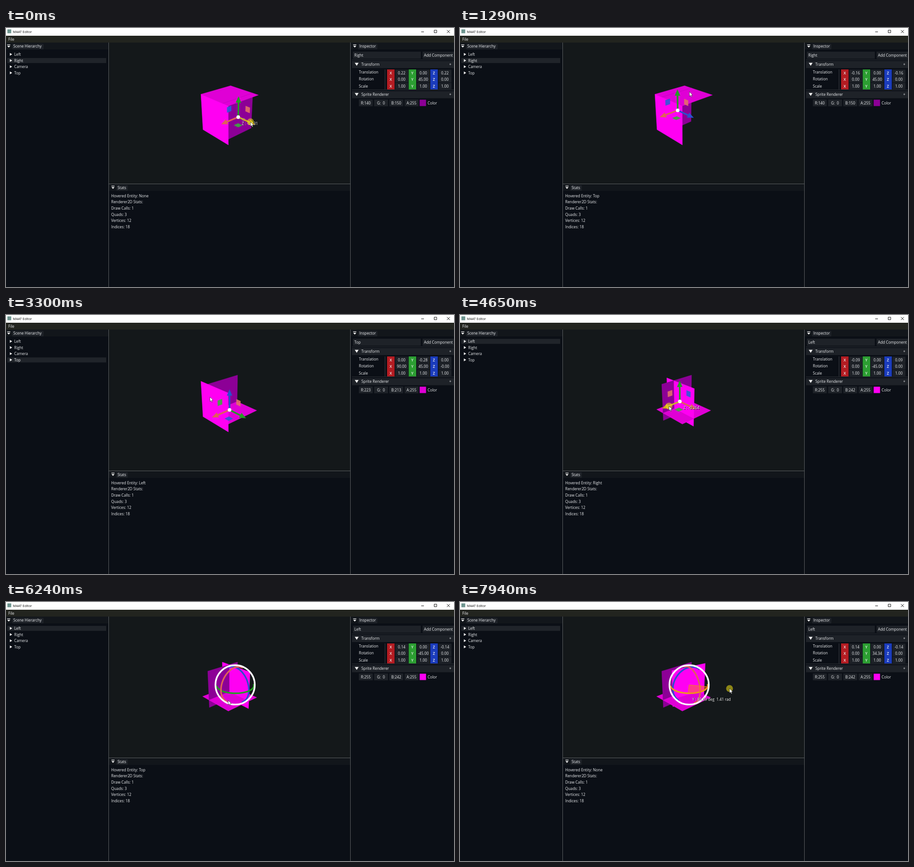
An HTML page with a canvas that plays this animation: 984 px wide and 569 px high, repeating every 7990 ms.

```html
<!DOCTYPE html>
<html lang="en">
<head>
<meta charset="utf-8">
<title>Editor</title>
<style>
  html, body { margin: 0; width: 100%; height: 100%; overflow: hidden; background: #0b0f16; }
  svg, canvas { position: absolute; left: 0; top: 0; width: 984px; height: 569px; }
  text { font: 8.3px "Open Sans", "Noto Sans", sans-serif; fill: #eceef0; white-space: pre; }
  .mid { text-anchor: middle; }
  .bold { font-weight: 600; }
  .dark { font-size: 7.4px; fill: #111; }
</style>
</head>
<body>
<svg id="ui" viewBox="0 0 984 569"></svg>
<canvas id="view" width="984" height="569"></canvas>
<script>
const LOOP = 7990;
const FIELD = '#1e2228';

// ---------- static interface ----------
const rect = (x, y, w, h, fill, extra = '') =>
  `<rect x="${x}" y="${y}" width="${w}" height="${h}" fill="${fill}" ${extra}/>`;
const label = (x, y, str, cls = '', id = '') =>
  `<text x="${x}" y="${y + 3}" class="${cls}" id="${id}">${str}</text>`;
const shape = (d, fill = '#f4f4f4', extra = '') => `<path d="${d}" fill="${fill}" ${extra}/>`;
const tab = (x, y, w, str) =>
  rect(x + 11, y - 5, w, 12, FIELD, 'rx="1"') +
  shape(`M${x} ${y - 4}h7v1.2h-7zM${x} ${y - 1}h7l-3.5 4z`) +
  label(x + 13.5, y + .3, str);
const header = (y, str) =>
  rect(760, y - 7.5, 224, 15.5, FIELD) +
  shape(`M766 ${y - 3.5}h8.5l-4.2 6.5z`) +
  label(780.5, y, str) + label(973.5, y, '+');

const entities = ['Left', 'Right', 'Camera', 'Top'];
const rowY = name => 58 + 13.6 * entities.indexOf(name);
const axisFields = [['X', 837, '#b41c22'], ['Y', 884.5, '#2c9e32'], ['Z', 932, '#1b3cbc']];
const transformRows = [['Translation', 98.5, 97], ['Rotation', 112.5, 112], ['Scale', 127.5, 127.5]];
const channelX = [775, 808.5, 842, 875.5];

function buildInterface() {
  let s = rect(0, 0, 984, 569, '#0b0f16') + rect(0, 0, 984, 17, '#fff') + rect(0, 17, 984, 15, '#22241f');
  s += rect(3, 3, 8.5, 8.5, '#6f9690') + label(15, 8, 'MAAT Editor', 'dark');
  s += shape('M912 8.5h6M940.5 4.8h5.5v5.5h-5.5zM968.5 4.5l6.5 6.5M975 4.5l-6.5 6.5', 'none', 'stroke="#111"');
  s += label(5, 25, 'File');

  for (const [x, y, w] of [[0, 32, 225], [226, 343, 530], [757, 32, 227]]) s += rect(x, y, w, 15, '#12161b');
  s += rect(226, 32, 530, 310, '#14181a');
  s += rect(225, 32, 1, 537, '#5c5f62') + rect(756, 32, 1, 537, '#5c5f62') + rect(226, 342, 530, 1, '#5c5f62');
  s += tab(2.5, 40, 69, 'Scene Hierarchy') + tab(231.5, 350.5, 25, 'Stats') + tab(762.5, 40, 42, 'Inspector');

  s += rect(3, 0, 217, 11, '#20242a', 'id="selection"');
  for (const name of entities) {
    const y = rowY(name);
    s += shape(`M8.5 ${y - 3.3}l5 3.1l-5 3.1z`) + label(18, y, name);
  }
  ['', 'Renderer2D Stats:', 'Draw Calls: 1', 'Quads: 3', 'Vertices: 12', 'Indices: 18'].forEach((str, i) =>
    s += label(231, 368.7 + 13.6 * i, str, '', i ? '' : 'hover'));

  s += rect(762, 52, 149, 15.5, FIELD) + label(765, 59.8, '', '', 'name');
  s += rect(915, 52, 69, 15.5, FIELD) + label(918, 59.8, 'Add Component');
  s += rect(760, 69.5, 224, 1, '#33363b') + rect(760, 135.5, 224, 1, '#33363b');
  s += header(80, 'Transform') + header(146.3, 'Sprite Renderer');
  s += rect(832, 91, 1, 44, '#3a3d42');
  transformRows.forEach(([name, y, nameY], r) => {
    s += label(775, nameY, name);
    axisFields.forEach(([axis, x, fill], c) => {
      s += rect(x, y - 7.5, 16.5, 15, fill) + rect(x + 18, y - 7, 28.5, 14, FIELD);
      s += label(x + 8, y, axis, 'mid bold') + label(x + 32, y, '1.00', 'mid', `v${r}${c}`);
    });
  });
  channelX.forEach((x, i) => s += rect(x, 157, 30.5, 15, FIELD) + label(x + 15.2, 164.7, '', 'mid', 'ch' + i));
  s += rect(908.6, 157.5, 14, 14, '#000', 'id="swatch"') + label(926, 164.7, 'Color');
  document.getElementById('ui').innerHTML = s;
}

buildInterface();
const el = id => document.getElementById(id);
const setText = (id, str) => { if (el(id).textContent !== str) el(id).textContent = str; };

// ---------- timeline ----------
function track(keys, t) {
  const i = keys.findIndex(k => k[0] > t);
  if (i < 0) return keys[keys.length - 1].slice(1);
  if (!i) return keys[0].slice(1);
  const [a, b] = [keys[i - 1], keys[i]];
  const f = (t - a[0]) / (b[0] - a[0]);
  return a.slice(1).map((v, j) => v + (b[j + 1] - v) * f);
}
const stepAt = (steps, t) => steps.filter(s => s[0] <= t).pop()[1];

const rightKeys = [[70, .2225], [510, -.066], [710, -.066], [880, -.16]];
const topKeys = [[2050, .5], [2500, .3], [2570, .3], [2950, -.284]];
const leftKeys = [[4050, -.3536], [4150, -.33], [4250, -.33], [4650, -.09], [5000, .1], [5050, .1], [5200, .14]];
const spinKeys = [[7040, -45], [7300, -20], [7600, 12], [7810, 31], [7940, 34.34], [7965, 34.34], [7990, 35.69]];
const mouseKeys = [
  [70, 537, 206], [510, 512.5, 194], [710, 512.5, 194], [880, 505, 190], [1000, 505, 182], [1290, 504, 140],
  [1500, 503, 139], [1750, 503, 139], [2000, 490, 124], [2050, 490, 124], [2500, 490, 141], [2570, 490, 141],
  [2950, 490, 187], [3000, 488, 187], [3300, 448, 180], [3400, 448, 180], [3950, 433, 210], [4050, 433, 210],
  [4150, 436, 209], [4250, 436, 209], [4650, 459, 200], [5000, 475.5, 193], [5050, 475.5, 193], [5200, 479, 191],
  [5450, 488, 216], [6240, 488, 216], [6940, 501, 199], [7040, 501, 199], [7500, 548, 196], [7810, 588, 190],
  [7940, 592, 190]];
const hovers = [[0, 'None'], [760, 'Right'], [1120, 'Top'], [1900, 'None'], [2650, 'Right'], [2850, 'Top'],
  [3050, 'Left'], [3750, 'None'], [4400, 'Right'], [5280, 'Top'], [6700, 'Left'], [7420, 'None']];
const selections = [[0, 'Right'], [1550, 'Top'], [3370, 'Left']];
const moves = [[0, 900], [2050, 3000], [4050, 5220]];
const clicks = [[1540, 1620], [3360, 3430]];
const SPIN_START = 7040, ROTATE_MODE = 5950;
const within = (spans, t, pad = 0) => spans.some(([a, b]) => t >= a - pad && t < b + pad);

// ---------- camera ----------
const YAW = .04, PITCH = .437, DIST = 5.6, SCALE = 86, CX = 491, CY = 186.9;
const [sy, cy, sp, cp] = [Math.sin(YAW), Math.cos(YAW), Math.sin(PITCH), Math.cos(PITCH)];
const toCamera = [sy * cp, sp, cy * cp];
const dot = (a, b) => a[0] * b[0] + a[1] * b[1] + a[2] * b[2];
const add = (a, b, k = 1) => a.map((v, i) => v + b[i] * k);
const eye = toCamera.map(v => v * DIST);

function project(p) {
  const x = p[0] * cy - p[2] * sy, z = p[0] * sy + p[2] * cy;
  const k = SCALE * DIST / (DIST - dot(p, toCamera));
  return [CX + x * k, CY - (p[1] * cp - z * sp) * k, k];
}

// ---------- scene ----------
function sceneAt(t) {
  const [r] = track(rightKeys, t), [y] = track(topKeys, t), [l] = track(leftKeys, t), [spin] = track(spinKeys, t);
  const entity = (pos, angle, flat, rgb) => {
    const a = angle * Math.PI / 180, c = Math.cos(a), s = Math.sin(a);
    const axes = flat ? [[c, 0, -s], [s, 0, c], [0, -1, 0]] : [[c, 0, -s], [0, 1, 0], [s, 0, c]];
    const rot = [flat ? '90.00' : '0.00', angle.toFixed(2), flat ? '-0.00' : '0.00'];
    return { pos, axes, rot, rgb, color: `rgb(${rgb})` };
  };
  return {
    Left: entity([l, 0, -l], spin, false, [255, 0, 242]),
    Right: entity([r, 0, r], 45, false, [140, 0, 150]),
    Top: entity([0, y, 0], 45, true, [223, 0, 213])
  };
}

const g = el('view').getContext('2d');
function trace(points, close) {
  g.beginPath();
  points.forEach(p => g.lineTo(p[0], p[1]));
  if (close) g.closePath();
}
function fillShape(points, color) {
  g.fillStyle = color;
  trace(points, true);
  g.fill();
}
function strokeLine(points, color, width) {
  g.strokeStyle = color;
  g.lineWidth = width;
  trace(points);
  g.stroke();
}
function disc(x, y, r, color) {
  g.fillStyle = color;
  g.beginPath();
  g.arc(x, y, r, 0, 7);
  g.fill();
}

function quadOf({ pos, axes: [u, v, n], color }) {
  const corner = (a, b) => add(add(pos, u, a / 2), v, b / 2);
  return { points: [corner(-1, -1), corner(1, -1), corner(1, 1), corner(-1, 1)], n, o: pos, color };
}

function clip(quad, plane, sign) {
  const dist = p => sign * dot(plane.n, add(p, plane.o, -1));
  const out = [];
  quad.points.forEach((a, i) => {
    const b = quad.points[(i + 1) % quad.points.length], da = dist(a), db = dist(b);
    if (da >= 0) out.push(a);
    if (da * db < 0) out.push(add(a, add(b, a, -1), da / (da - db)));
  });
  return out.some(p => dist(p) > 1e-4) ? [{ ...quad, points: out }] : [];
}

// Splits quads along each other's planes and paints from back to front.
function paint(quads) {
  if (!quads.length) return;
  const [first, ...rest] = quads;
  const near = dot(first.n, add(eye, first.o, -1)) > 0 ? 1 : -1;
  paint(rest.flatMap(q => clip(q, first, -near)));
  const points = first.points.map(project);
  fillShape(points, first.color);
  g.strokeStyle = first.color;
  g.lineWidth = .5;
  g.stroke();
  paint(rest.flatMap(q => clip(q, first, near)));
}

// ---------- gizmos ----------
const axisColors = ['#de6258', '#22a022', '#2a50cc'];
const planeColors = ['rgba(226,112,104,.9)', 'rgba(62,168,62,.9)', 'rgba(44,92,214,.9)'];
const GOLD = '#d2a81c', ORANGE = '#ee9a1c';

function shadowText(str, x, y) {
  g.font = '8.3px "Open Sans", "Noto Sans", sans-serif';
  g.fillStyle = '#000';
  g.fillText(str, x + .7, y + .7);
  g.fillStyle = '#fff';
  g.fillText(str, x, y);
}

function moveGizmo({ pos, axes }, start, hot, dragging) {
  const [x, y, k] = project(pos), unit = 41.5 / k;
  const dirs = axes.map(a => a.map(v => v * (dot(a, toCamera) < 0 ? -unit : unit)));
  dirs.forEach((dir, i) => {
    const end = project(add(pos, dir));
    const len = Math.hypot(end[0] - x, end[1] - y), dx = (end[0] - x) / len, dy = (end[1] - y) / len;
    const color = i === 2 && hot ? GOLD : axisColors[i];
    const at = (along, side) => [end[0] + dx * along - dy * side, end[1] + dy * along + dx * side];
    strokeLine([[x, y], end], color, 3.4);
    fillShape([at(7, 0), at(-7, 6), at(-7, -6)], color);
    const [u, v] = [dirs[(i + 1) % 3], dirs[(i + 2) % 3]];
    const corner = (a, b) => project(add(add(pos, u, a), v, b));
    fillShape([corner(.5, .5), corner(.8, .5), corner(.8, .8), corner(.5, .8)], planeColors[i]);
  });
  disc(x, y, 4, '#fff');
  if (!dragging) return;
  const from = project(start);
  strokeLine([from, [x, y]], 'rgba(170,170,170,.55)', 1);
  g.beginPath();
  g.arc(from[0], from[1], 3, 0, 7);
  g.stroke();
  shadowText('Z : ' + (pos[2] - start[2]).toFixed(3), x + 8, y + 17);
}

function spinGizmo({ pos, axes }, hot, t) {
  const [x, y, k] = project(pos), r = 41 / k;
  const arc = (a, b, from, to) => Array.from({ length: 41 }, (_, i) => {
    const w = from + (to - from) * i / 40;
    return project(add(add(pos, a, r * Math.cos(w)), b, r * Math.sin(w)));
  });
  [2, 1, 0].forEach(i => {
    const a = axes[(i + 1) % 3], b = axes[(i + 2) % 3];
    const mid = Math.atan2(dot(b, toCamera), dot(a, toCamera)) + (i === 1 ? .1 : 0);
    strokeLine(arc(a, b, mid - Math.PI / 2, mid + Math.PI / 2), i === 1 && hot ? ORANGE : axisColors[i], 3.4);
  });
  g.strokeStyle = '#fff';
  g.lineWidth = 3.6;
  g.beginPath();
  g.arc(x, y, 43.2, 0, 7);
  g.stroke();
  if (t < SPIN_START) return;
  // The label runs one picture ahead of the pose.
  const deg = track(spinKeys, t + 50)[0] + 45, rad = deg * Math.PI / 180;
  const wedge = [[x, y], ...arc([0, 0, 1], [1, 0, 0], -.03, rad - .03)];
  fillShape(wedge, 'rgba(255,128,16,.45)');
  strokeLine([...wedge, [x, y]], '#f08a1c', 1);
  shadowText(`Y : ${deg.toFixed(2)} deg  ${rad.toFixed(2)} rad`, x + 7, y + 34.5);
}

function drawCursor(x, y, down) {
  if (down) disc(x, y, 7.5, 'rgba(240,225,20,.55)');
  const outline = [[0, 0], [0, 10], [2.3, 8], [3.9, 11.6], [5.5, 10.9], [4, 7.4], [7, 7.2]];
  const points = outline.map(p => [x + p[0], y + p[1]]);
  fillShape(points, '#fff');
  g.strokeStyle = '#111';
  g.lineWidth = .6;
  g.stroke();
}

// ---------- frame ----------
function updatePanels(name, e, t) {
  el('selection').setAttribute('y', rowY(name) - 5.6);
  setText('hover', 'Hovered Entity: ' + stepAt(hovers, t));
  setText('name', name);
  e.pos.forEach((v, i) => {
    setText('v0' + i, v.toFixed(2));
    setText('v1' + i, e.rot[i]);
  });
  [...e.rgb, 255].forEach((v, i) => setText('ch' + i, 'RGBA'[i] + ':' + String(v).padStart(3)));
  el('swatch').setAttribute('fill', e.color);
}

function render(t) {
  const scene = sceneAt(t), name = stepAt(selections, t), selected = scene[name];
  const starts = { Right: [.3535, 0, .3535], Top: [0, .5, 0], Left: [-.3535, 0, .3535] };
  const [mx, my] = track(mouseKeys, t), dragging = within(moves, t);
  updatePanels(name, selected, t);
  g.clearRect(0, 0, 984, 569);
  paint(Object.values(scene).map(quadOf));
  if (t < ROTATE_MODE) moveGizmo(selected, starts[name], within(moves, t, 70), dragging);
  else spinGizmo(selected, t > 6780, t);
  drawCursor(mx, my, dragging || within(clicks, t) || t >= SPIN_START);
}

const began = performance.now();
function frame() {
  render((performance.now() - began) % LOOP);
  requestAnimationFrame(frame);
}
frame();
</script>
</body>
</html>
```
